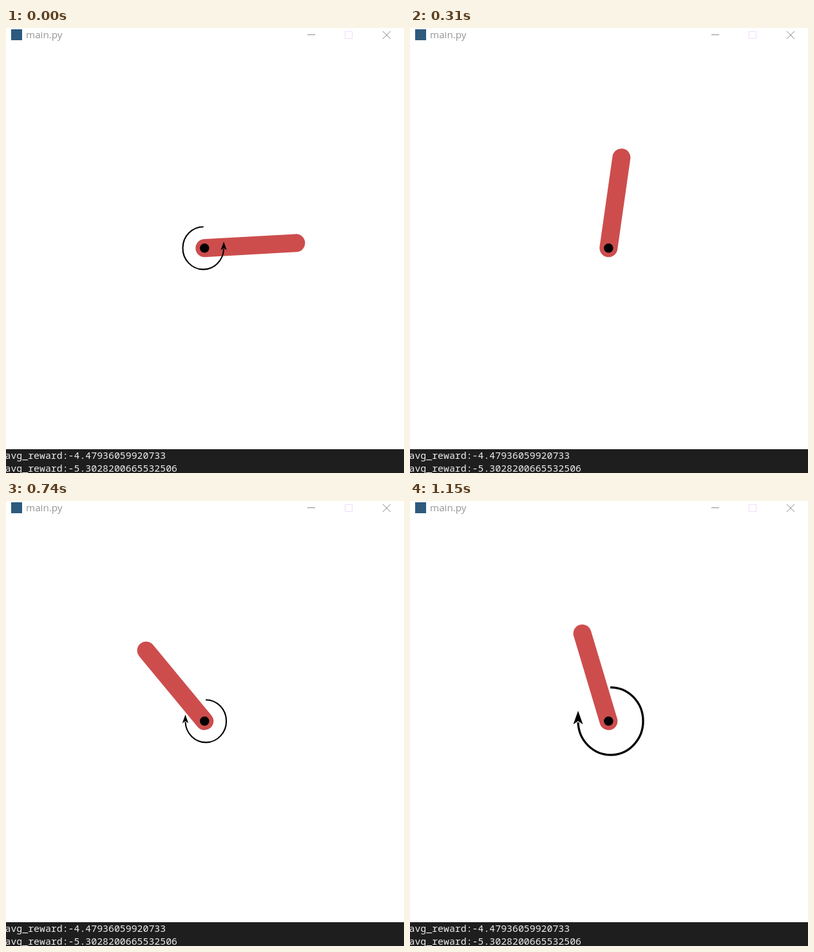
Recreate the animation shown at these times as an HTML page. Size 618 by 692 pixels, loop 1200 ms.

```html
<!DOCTYPE html>
<html lang="en">
<head>
<meta charset="utf-8">
<title>Pendulum</title>
<style>
  html, body { margin: 0; width: 100%; height: 100%; overflow: hidden; background: #fff; }
  svg { display: block; width: 100%; height: 100%; }
  .title { font: 15.2px "Open Sans", "Noto Sans", sans-serif; fill: #959595; }
  .log { font: 14.87px "Noto Sans Mono", "DejaVu Sans Mono", monospace; fill: #ededed; }
  .line { fill: none; stroke: #8c8c8c; }
</style>
</head>
<body>
<svg viewBox="0 0 618 692">
  <rect width="618" height="692" fill="#fff"/>

  <rect x="8" y="2" width="17" height="17" fill="#2d5a7d"/>
  <text class="title" x="31" y="16">main.py</text>
  <path class="line" d="M468 10.5H480"/>
  <rect class="line" x="526.5" y="5.5" width="11" height="11" style="stroke:#f1dcff"/>
  <path class="line" d="M585 5L597 17M597 5L585 17"/>

  <g transform="translate(308.3 342.3)">
    <path id="rod" d="M0 0V-142.3" stroke="#cd4d4d" stroke-width="28" stroke-linecap="round"/>
    <g id="torque">
      <path id="arc" d="M2.7 -52.5A50.5 52.5 0 1 1 -47.3 2" fill="none" stroke="#000"/>
      <path d="M-47.3 -16L-39.8 5L-47.3 0L-54.8 5Z"/>
    </g>
    <circle r="7.2"/>
  </g>

  <rect y="655" width="618" height="37" fill="#1e1e1e"/>
  <text class="log" x="-1.5" y="670">avg_reward:-4.47936059920733</text>
  <text class="log" x="-1.5" y="690">avg_reward:-5.3028200665532506</text>
</svg>
<script>
  const LOOP = 1200;
  const [rod, torque, arc] = ['rod', 'torque', 'arc'].map(id => document.getElementById(id));

  // Ticks last 50 ms, except for these shorter ones.
  const shortTicks = [100, 280, 460, 740, 920];
  const ticks = [];
  for (let t = 0; t < LOOP; t += shortTicks.includes(t) ? 30 : 50) ticks.push(t);

  // One free turn of a pendulum that hangs straight down at time `low`.
  const turn = (t, low) => 720 / Math.PI * Math.atan(Math.exp((t - low) / 93.9));

  // Degrees left of upright: a braked rise to the top, then a fall into a full turn.
  function angleAt(t) {
    if (t < 500) return 0.0533 * t - 24.6 - 62.2 * Math.exp(-((t / 62.8) ** 1.4));
    return turn(t, 905) + turn(t, 1330);
  }

  // Short pushes: time, size; positive is anticlockwise.
  const pushes = [[0, 0.63], [490, 0.24], [740, -0.63], [1150, -1]];
  const pushAt = t => pushes.reduce(
    (sum, [at, size]) => sum + size * Math.max(0, 1 - Math.abs(t - at) / 130), 0);

  function draw() {
    const now = performance.now() % LOOP;
    const t = ticks.filter(x => x <= now).pop();
    const u = pushAt(t);
    const size = Math.abs(u);
    rod.setAttribute('transform', `rotate(${-angleAt(t)})`);
    torque.style.display = size < 0.02 ? 'none' : '';
    if (size >= 0.02) {
      torque.setAttribute('transform', `scale(${-u} ${size})`);
      arc.setAttribute('stroke-width', Math.max(3.3, 1.4 / size));
    }
    requestAnimationFrame(draw);
  }
  draw();
</script>
</body>
</html>
```
